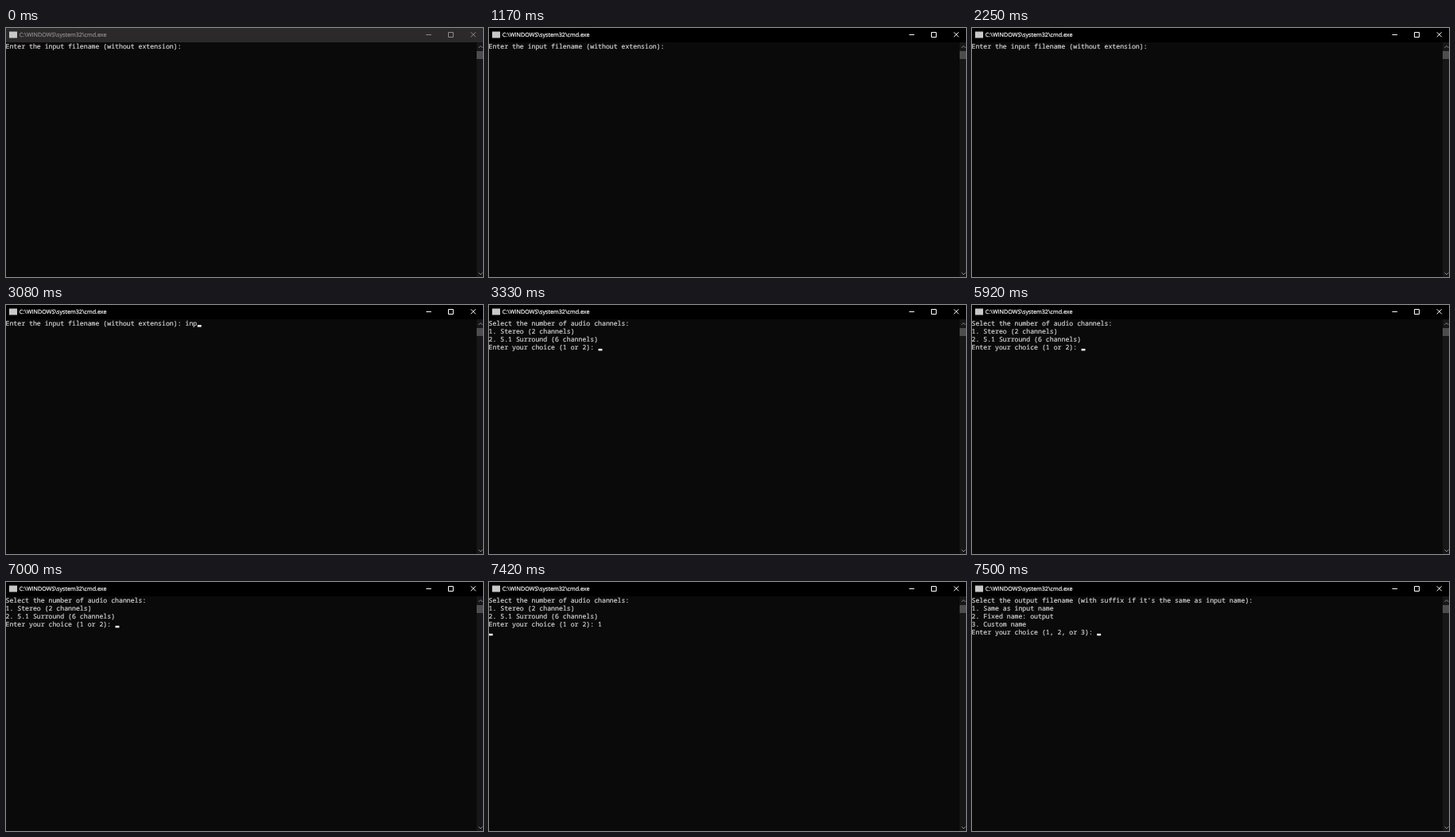
Recreate the animation shown at these times as an HTML page. Size 600 by 313 pixels, loop 8000 ms.

```html
<!DOCTYPE html>
<html lang="en">
<head>
<meta charset="utf-8">
<title>Console</title>
<style>
  html, body { margin: 0; width: 100%; height: 100%; overflow: hidden; background: #0b0a0b; }
  svg { display: block; width: 600px; height: 313px; }
  text { text-rendering: geometricPrecision; white-space: pre; stroke-width: .2; }
  #title { font: 7.2px "Open Sans", sans-serif; fill: currentColor; stroke: currentColor; }
  #lines { font: 8.2px "Noto Sans Mono", monospace; fill: #d2d2d2; stroke: #d2d2d2; }
  #bar { color: #8e8c8c; }
  #bar > rect { fill: #2b2929; }
  #bar.active { color: #fff; }
  #bar.active > rect { fill: #000; }
  path { fill: none; stroke: currentColor; }
</style>
</head>
<body>
<svg viewBox="0 0 600 313">
  <rect width="600" height="313" fill="#0b0a0b"/>
  <g id="bar">
    <rect width="600" height="18"/>
    <path d="M4 4.5h10v8h-10z" style="fill:#c8c8c8;stroke:none"/>
    <text id="title" x="16.8" y="11.2">C:\WINDOWS\system32\cmd.exe</text>
    <path d="M528.5 8.5h6.5M556.5 5.5h6v6h-6zM584.8 5.3l6 6m0-6l-6 6"/>
  </g>
  <rect x="592" y="18" width="8" height="295" fill="#171717"/>
  <rect x="592" y="29" width="8" height="10" fill="#4d4d4d"/>
  <path d="M594.5 25l2.5-2.5 2.5 2.5M594.5 307.5l2.5 2.5 2.5-2.5" color="#888"/>
  <g id="lines"></g>
  <rect id="cursor" width="4.9" height="2.5" fill="#f2f2f2"/>
</svg>
<script>
const LOOP = 8000, CHAR = 4.92, LINE = 9.95, BASE = 26;
const $ = id => document.getElementById(id);

const ask = 'Enter the input filename (without extension): ';
const channels = `Select the number of audio channels:
1. Stereo (2 channels)
2. 5.1 Surround (6 channels)
Enter your choice (1 or 2): `;
const output = `Select the output filename (with suffix if it's the same as input name):
1. Same as input name
2. Fixed name: output
3. Custom name
Enter your choice (1, 2, or 3): `;

// [start ms, screen text, cursor visible]
const steps = [
  [0, ask, false],
  [1670, ask, true],
  [2250, ask, false],
  [2670, ask + 'i', false],
  [2750, ask + 'i', true],
  [3000, ask + 'in', true],
  [3080, ask + 'inp', true],
  [3170, ask + 'inpu', true],
  [3250, ask + 'input', true],
  [3330, channels, true],
  [4330, channels, false],
  [4920, channels, true],
  [5420, channels, false],
  [5920, channels, true],
  [6500, channels, false],
  [7000, channels, true],
  [7080, channels + '1', true],
  [7420, channels + '1\n', true],
  [7500, output, true]
];

let shown;
function show(step) {
  if (step === shown) return;
  shown = step;
  const [, text, cursorOn] = step;
  const rows = text.split('\n');
  $('lines').innerHTML = rows
    .map((row, i) => `<text x="-0.5" y="${BASE + i * LINE}">${row}</text>`).join('');
  $('cursor').setAttribute('x', rows.at(-1).length * CHAR - 0.2);
  $('cursor').setAttribute('y', BASE - 0.9 + (rows.length - 1) * LINE);
  $('cursor').style.display = cursorOn ? '' : 'none';
}

function draw(now) {
  const t = now % LOOP;
  $('bar').classList.toggle('active', t >= 1170);
  show(steps.findLast(([start]) => start <= t));
  requestAnimationFrame(draw);
}
draw(0);
</script>
</body>
</html>
```
